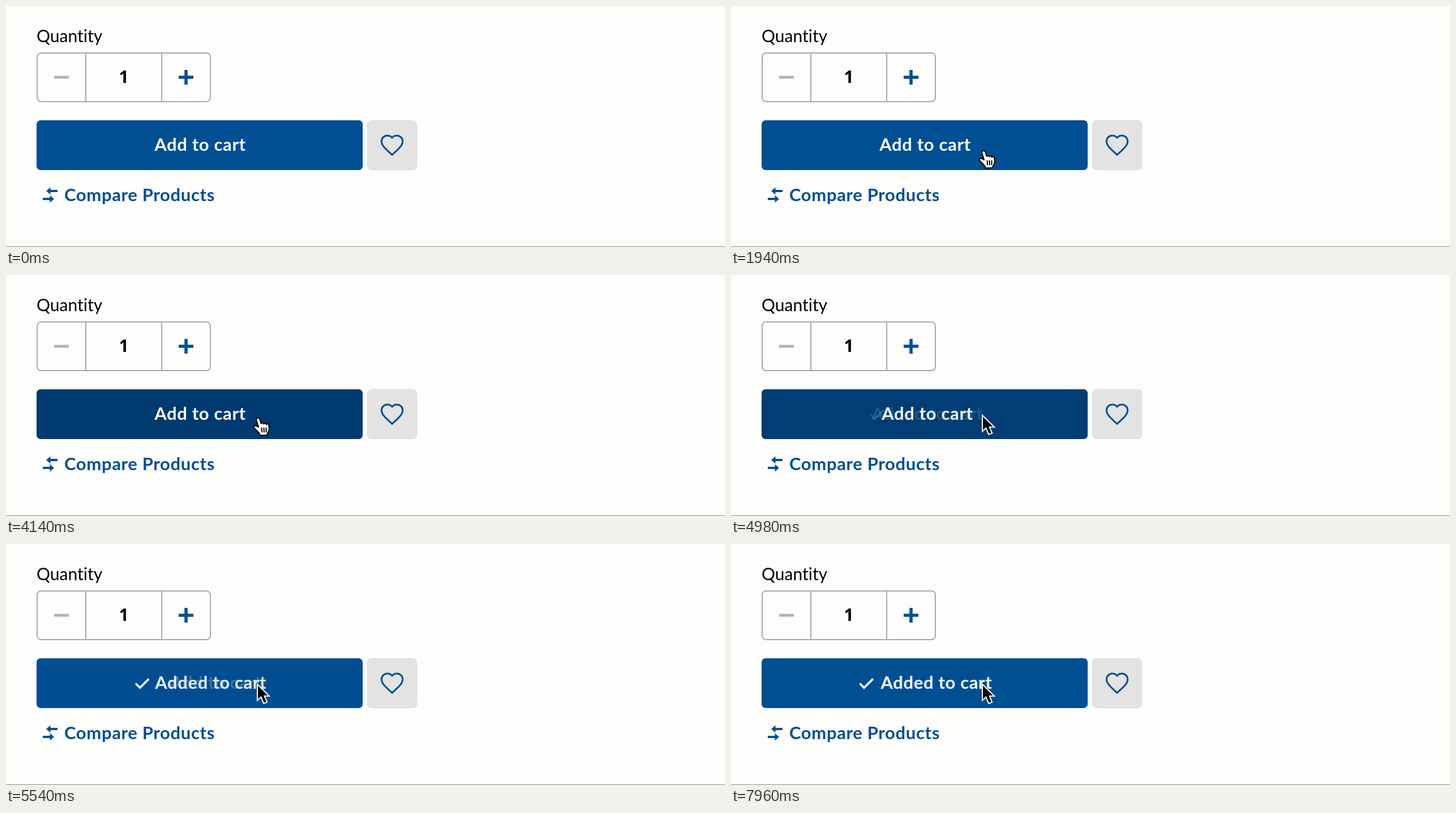
Animation, 1270 px wide and 426 px high, one loop 8000 ms. Source, as an HTML page:

```html
<!DOCTYPE html>
<html lang="en">
<head>
<meta charset="utf-8">
<title>Add to cart</title>
<style>
  html, body { margin: 0; width: 100%; height: 100%; overflow: hidden; background: #fdfdfc; }
  svg { display: block; width: 1270px; height: 426px; }
  text {
    font-family: Lato, "Open Sans", sans-serif; font-size: 31px; font-weight: 700;
    letter-spacing: .65px; font-variant-ligatures: none;
  }
  .blue { fill: #004f93; }
  .label { fill: #fff; }
  .quantity { font-size: 30px; font-weight: 400; letter-spacing: 0; }
  .count { font-family: "Open Sans", sans-serif; font-size: 30px; letter-spacing: 0; }
  .frame { fill: none; stroke: #a9a9a4; stroke-width: 2; }
</style>
</head>
<body>
<svg viewBox="0 0 1270 426">
  <rect width="1270" height="426" fill="#fdfdfc"/>
  <rect y="425" width="1270" height="1" fill="#8a8a7c"/>

  <text class="quantity" x="54" y="64">Quantity</text>
  <g class="frame">
    <rect x="55" y="83" width="306" height="86" rx="7"/>
    <path d="M141 83v86M275 83v86"/>
  </g>
  <rect x="85" y="123.500" width="26" height="5" fill="#b3b3ae"/>
  <text class="count" x="208" y="136" text-anchor="middle">1</text>
  <path class="blue" d="M305 123.200h10.200v-10.200h5.600v10.200h10.200v5.600h-10.200v10.200h-5.600v-10.200h-10.200z"/>

  <rect id="button" x="54" y="202" width="576" height="88" rx="7" fill="#004f93"/>
  <text id="before" class="label" x="343" y="256" text-anchor="middle">Add to cart</text>
  <text id="after" class="label" x="363" y="256" text-anchor="middle" opacity="0">Added to cart</text>
  <path id="check" d="M227.500 246.500l7.500 7.700 15.800-15.800" fill="none" stroke="#fff" stroke-width="3.700" opacity="0"/>

  <rect x="638.500" y="202.500" width="87" height="87" rx="7" fill="#e3e3e2" stroke="#d8d8d6"/>
  <path transform="translate(682 246) scale(1.86) translate(-12 -12.17)" fill="none" stroke="#004f93" stroke-width="1.65"
    d="M16.5 3c-1.74 0-3.41.81-4.5 2.09C10.91 3.81 9.24 3 7.5 3 4.42 3 2 5.42 2 8.5c0 3.78 3.4 6.86 8.55 11.54L12 21.35l1.45-1.32C18.6 15.36 22 12.28 22 8.5 22 5.42 19.58 3 16.5 3z"/>

  <path class="blue" d="M71 327l7.500-6.500v4.500h12.500v4h-12.500v4.500zM85 341l-7.500-6.500v4.500h-12.500v4h12.500v4.500z"/>
  <text class="blue" x="103" y="345">Compare Products</text>

  <g id="cursor" opacity="0">
    <path id="arrow" d="M0 0v28.500l6.500-6 4.700 11.500 6-2.500-4.700-10.700h8.500z" stroke="#fff" stroke-width="2"/>
    <g id="hand" opacity="0" stroke="#000" stroke-width="2" stroke-linejoin="round" stroke-linecap="round">
      <path fill="#fff" d="M1 8C-1 8.600-1 10.500-.6 12L3 24C1 22-3 20.500-5 22-6.500 23.500-5 25-3.500 26.500L4 34.500C5 35.500 5 37 6 38.500L17.500 38C18 35 22 32 22 27L21 20C20.500 17.500 17.500 17.500 17 19.500 16 16.500 13 16.500 12.500 18.500 11.500 16.500 8 16.500 7.500 17.500L5 9.500C4.300 8 2.500 7.300 1 8z"/>
      <path d="M8.500 25.500l.5 7M12.500 25.500l.3 7M16.500 25.500v7" fill="none"/>
    </g>
  </g>
</svg>
<script>
  const LOOP = 8000, SHOW = 780, ENTER = 1760, CLICK = 4860, DONE = 5860;
  const BLUE = "#004f93", DARK = "#003a70";
  const $ = id => document.getElementById(id);
  const move = (x, y = 0) => `translate(${x}px, ${y}px)`;

  // Steps are [ms, value, easing towards the next step].
  function play(id, prop, steps) {
    const all = [[0, steps[0][1]], ...steps, [LOOP, steps.at(-1)[1]]];
    $(id).animate(
      all.map(([ms, value, easing = "linear"]) => ({ offset: ms / LOOP, [prop]: value, easing })),
      { duration: LOOP, iterations: Infinity }
    );
  }
  const fade = (id, from, to, easing = "ease") =>
    play(id, "opacity", [[CLICK, from, easing], [DONE, to]]);
  const slide = (id, from, to) =>
    play(id, "transform", [[CLICK, move(from), "ease"], [DONE, move(to)]]);

  play("cursor", "opacity", [[SHOW, 0], [SHOW, 1]]);
  play("cursor", "transform", [
    [SHOW, move(682, 374)],
    [1360, move(620, 360)],
    [1520, move(620, 360), "ease-in-out"],
    [1940, move(444, 248)],
    [2040, move(444, 248), "ease-in-out"],
    [2400, move(443, 245)],
    [CLICK, move(443, 245)],
    [CLICK, move(444, 248)]
  ]);
  play("hand", "opacity", [[ENTER, 0], [ENTER, 1], [CLICK, 1], [CLICK, 0]]);
  play("arrow", "opacity", [[ENTER, 1], [ENTER, 0], [CLICK, 0], [CLICK, 1]]);

  play("button", "fill", [
    [2040, BLUE, "ease"], [2840, DARK],
    [CLICK, DARK, "ease"], [DONE, BLUE]
  ]);
  fade("before", 1, 0, "ease-in-out");
  slide("before", 0, 30);
  fade("after", 0, 1);
  slide("after", -18.5, 0);
  fade("check", 0, 1);
  slide("check", 22, 0);
</script>
</body>
</html>
```
